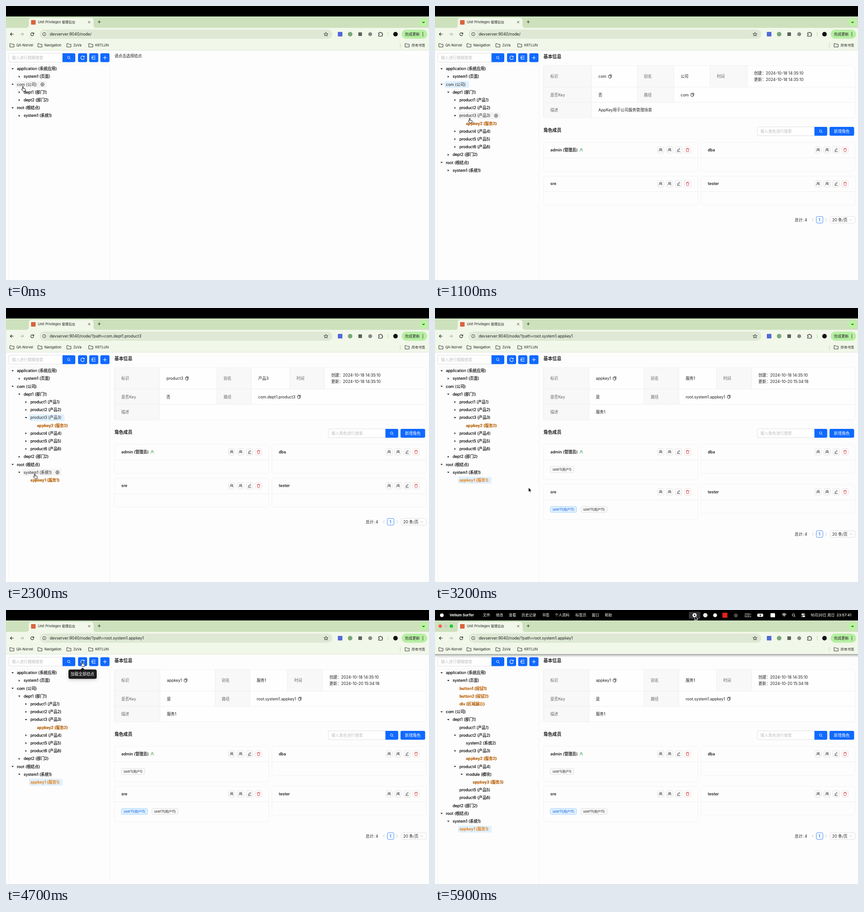
Animation, 928 px wide and 603 px high, one loop 6 s. Source, as an HTML page with a canvas:

```html
<!DOCTYPE html>
<html lang="zh">
<head>
<meta charset="utf-8">
<style>
html, body { margin: 0; width: 928px; height: 603px; overflow: hidden; background: #fdfdfd; }
canvas { display: block; }
</style>
</head>
<body>
<canvas id="stage" width="928" height="603"></canvas>
<script>
const c = document.getElementById('stage').getContext('2d');
const INK = '#1f1f1f', BLUE = '#0f69ff', LINE = '#efeff1', ORANGE = '#e5831f', RED = '#d3343c';
const LOOP = 6000, LOAD = 4900, MENU = 5500, LAZY = Infinity;

// Tree nodes: depth, label, time the node opens (none for a leaf)
const nodes = [
  [0, 'application (系统应用)', 0],
  [1, 'system1 (页面)', LOAD],
  [2, 'button1 (按钮1)'], [2, 'button2 (按钮2)'], [2, 'div (区域展示)'],
  [0, 'com (公司)', 0],
  [1, 'dept1 (部门1)', 600],
  [2, 'product1 (产品1)', LAZY],
  [2, 'product2 (产品2)', LOAD], [3, 'system2 (系统2)'],
  [2, 'product3 (产品3)', 1000], [3, 'appkey2 (服务2)'],
  [2, 'product4 (产品4)', LOAD], [3, 'module (模块)', LOAD], [4, 'appkey3 (服务3)'],
  [2, 'product5 (产品5)', LAZY], [2, 'product6 (产品6)', LAZY],
  [1, 'dept2 (部门2)', LAZY],
  [0, 'root (根结点)', 0],
  [1, 'system1 (系统1)', 2100], [2, 'appkey1 (服务1)'],
];

const pages = [
  { from: 300, key: 'com', alias: '公司', isKey: '否', path: 'com', desc: 'AppKey用于公司服务管理场景',
    updated: '2024-10-18 14:35:10', url: '', cols: [238, 343.5, 443.5, 524, 603.5, 685] },
  { from: 1300, key: 'product3', alias: '产品3', isKey: '否', path: 'com.dept1.product3', desc: '',
    updated: '2024-10-18 14:35:10', url: '?path=com.dept1.product3', cols: [238, 337, 462.5, 538.5, 622.5, 698.5] },
  { from: 2700, key: 'appkey1', alias: '服务1', isKey: '是', path: 'root.system1.appkey1', desc: '服务1', users: true,
    updated: '2024-10-20 15:34:18', url: '?path=root.system1.appkey1', cols: [238, 338, 458.5, 535, 617.5, 694.5] },
];

// Pointer stops: time, x, y
const stops = [
  [0, 37, 177], [300, 37, 177], [500, 29, 190], [600, 29, 190], [900, 44, 242], [1000, 44, 242],
  [1100, 76, 247], [1300, 76, 247], [1900, 29, 362], [2100, 29, 362], [2300, 63, 365], [2600, 80, 379],
  [2800, 80, 379], [3200, 205, 395], [3500, 225, 400], [3800, 341, 447], [4250, 341, 447],
  [4700, 167, 114], [4950, 167, 114], [5100, 144, 168], [5200, 165, 150], [5500, 550, 3], [5700, 570, 13], [6000, 570, 13],
];

function pointerAt(t) {
  const i = stops.findIndex(s => s[0] > t);
  const [t0, x0, y0] = stops[i - 1], [t1, x1, y1] = stops[i];
  const u = (t - t0) / (t1 - t0), k = u * u * (3 - 2 * u);
  return [x0 + (x1 - x0) * k, y0 + (y1 - y0) * k];
}

function text(s, x, y, size = 8.6, color = INK, weight = 400) {
  c.font = `${weight} ${size}px Inter, "Noto Sans CJK SC", "Noto Sans CJK JP", sans-serif`;
  c.fillStyle = color;
  c.fillText(s, x, y + size * .35);
  return x + c.measureText(s).width;
}
function box(x, y, w, h, r, fill, stroke) {
  c.beginPath();
  c.roundRect(x, y, w, h, r);
  if (fill) { c.fillStyle = fill; c.fill(); }
  if (stroke) { c.strokeStyle = stroke; c.lineWidth = .8; c.stroke(); }
}
function dot(x, y, r, fill) { box(x - r, y - r, 2 * r, 2 * r, r, fill); }
function icon(d, x, y, stroke = INK, width = .9, fill) {
  const p = new Path2D(d);
  c.save();
  c.translate(x, y);
  if (fill) { c.fillStyle = fill; c.fill(p); }
  c.strokeStyle = stroke;
  c.lineWidth = width;
  if (width) c.stroke(p);
  c.restore();
}
function rule(x0, y0, x1, y1, color = LINE) { icon(`M${x0} ${y0}L${x1} ${y1}`, 0, 0, color, 1); }

const FOLDER = 'M-4.5-3.5h3.2l1.3 1.4h4.5v6h-9z';
const LENS = 'M2-.6a2.6 2.6 0 1 1-5.2 0a2.6 2.6 0 1 1 5.2 0M1.3 1.4l2.3 2.3';
const COPY = 'M-1.8-3.6h5v6M-3.2-2.2h4.6v6h-3l-1.6-1.6z';
const PERSON = 'M1.7-1.5a1.7 1.7 0 1 1-3.4 0a1.7 1.7 0 1 1 3.4 0M-3 3.7c0-5 6-5 6 0';
const TEAM = 'M1-1.6a1.8 1.8 0 1 1-3.6 0a1.8 1.8 0 1 1 3.6 0M-3.8 3.4c0-4 5-4 5-1M1-3.3c2.5 0 2.5 3 .6 3.6l2.2 3';
const EDIT = 'M-2.5 1.6l.4-1.9l3.4-3.4l1.6 1.6l-3.4 3.4zM-3.7 3.6h7.4';
const TRASH = 'M-3.7-2.2h7.4M-1.4-2.3v-1.3h2.8v1.3M-2.7-2l.4 5.6h4.6l.4-5.6';
const GEAR = 'M-1.9-3.4h3.8l1.9 3.4l-1.9 3.4h-3.8l-1.9-3.4zM1.3 0a1.3 1.3 0 1 1-2.6 0a1.3 1.3 0 1 1 2.6 0';
const ARROW = 'M0 0v10l2.3-2.1l1.5 3.4l1.7-.8l-1.5-3.2h3.2z';
const HAND = 'M-.8.8c0-1.3 1.8-1.3 1.8 0v3.4l3.6.9c1 .3 1.2.8 1 1.8l-.7 3.8h-4.4l-3-3.9c-.7-1.1.5-1.9 1.7-.6z';
const IBEAM = 'M-2-5q2 0 2 1.5v7q0 1.5-2 1.5M2-5q-2 0-2 1.5v7q0 1.5 2 1.5M-1 1.5h2';

function browser(url) {
  box(0, 0, 928, 23, 0, '#000');
  box(0, 23, 928, 25, 0, '#cde1bd');
  box(0, 48, 928, 49.5, 0, '#f1f7e9');
  rule(0, 97.5, 928, 97.5, '#e4eadd');
  icon('M44 48q6 0 6-6v-10q0-6 6-6h130q6 0 6 6v10q0 6 6 6z', 0, 0, '', 0, '#f1f7e9');
  box(55, 31, 10, 10, 1, '#d9653d');
  text('Unit Privileges 管理后台', 70, 35.5, 7.4);
  icon('M-2.2-2.2l4.4 4.4M2.2-2.2l-4.4 4.4', 182.5, 35.5);
  icon('M-3.3 0h6.6M0-3.3v6.6', 204.5, 35);
  box(908, 28, 16, 15.5, 5, '#b5f79b');
  icon('M-2.3-1l2.3 2.2l2.3-2.2', 916, 35.8, INK, 1.2);

  icon('M3.7 0h-7.2M-.2-3.4l-3.4 3.4l3.4 3.4', 13, 62, INK, 1.1);
  icon('M-3.7 0h7.2M.2-3.4l3.4 3.4l-3.4 3.4', 35, 62, '#98a092', 1);
  icon('M3.2-1a3.3 3.3 0 1 0 .1 2M3.5-3.6v2.8h-2.8', 57.5, 62, INK, 1.1);
  box(74, 52, 642, 20, 10, '#dee8d5');
  dot(84, 62, 6.5, '#f1f7e9');
  icon('M3.8 0a3.8 3.8 0 1 1-7.6 0a3.8 3.8 0 1 1 7.6 0M0-.5v2.5M0-2.1v1', 84, 62);
  text('devserver:9040/node/' + url, 96, 62);
  icon('M0-4.4l1.3 3h3.2l-2.5 2l.9 3.2l-2.9-1.9l-2.9 1.9l.9-3.2l-2.5-2h3.2z', 702, 62.3);
  box(728, 57, 10, 10, 1, '#5268d8');
  dot(755, 62, 5, '#79a878');
  box(773, 58, 8, 8, 1, '#5d625c');
  dot(799, 62, 4.3, '#858a82');
  icon('M-4-3h2.6c0-2 2.6-2 2.6 0h2.6v2.6c1.7 0 1.7 2.2 0 2.2v2.7h-7.8v-2.5c2-.2 2-2.3 0-2.5z', 821.5, 62, INK, 1.1);
  rule(838.5, 57, 838.5, 67, '#b5e3a0');
  dot(854.5, 62, 5, '#111');
  box(868, 52, 56, 20, 10, '#b6efa3');
  text('完成更新', 875, 62, 8.2, INK, 500);
  [-3.4, 0, 3.4].forEach(d => dot(914.5, 62 + d, .95, INK));

  [['QA-Norvel', 13], ['Navigation', 74.5], ['ZuVa', 138], ['KRTLUN', 186], ['所有书签', 880]].forEach(([s, x], i) => {
    icon(FOLDER, x, 86.3);
    text(s, i < 4 ? x + 9.7 : 890, 86.5, 7.4);
  });
  rule(865, 82, 865, 92, '#b5e3a0');
}

function menuBar(t) {
  const alpha = Math.min(1, (t - MENU + 100) / 200);
  if (alpha <= 0) return;
  c.globalAlpha = alpha;
  dot(15, 11.5, 4, '#fff');
  text('Vellum Surfer', 32, 11.5, 8, '#fff', 700);
  [['文件', 105], ['修改', 133.5], ['查看', 162], ['历史记录', 190], ['书签', 235], ['个人资料', 263],
   ['标签页', 308], ['窗口', 344], ['帮助', 372.5]].forEach(([s, x]) => text(s, x, 11.5, 8, '#fff', 500));
  if (t >= 5700) box(557, 4, 25, 15, 2, '#343436');
  dot(569.5, 11.5, 4.5, '#fff');
  dot(569.5, 11.5, 1.7, '#222');
  dot(593, 11.5, 4.8, '#e8e8e8');
  dot(614.5, 11.5, 4.3, '#f2f2f2');
  box(630.5, 6, 11, 11, 0, '#e5201b');
  dot(660, 12, 4.4, '#4a4a4a');
  text('2KB/s', 679, 8.7, 5.2, '#fff');
  text('0KB/s', 679, 14.3, 5.2, '#fff');
  box(707, 8, 13, 7, 2, '#f2f2f2');
  icon('M1-3l-3 3.5h2.2l-.8 3l3.2-3.8h-2.2z', 713.5, 11.5, '', 0, '#000');
  box(736, 7, 10, 9, 1.5, '#fff');
  icon('M-4.5-1.5q4.5-4 9 0M-2.8.5q2.8-2.5 5.6 0M-1 2.3q1-1 2 0', 766, 11.5, '#fff', 1.3);
  icon(LENS, 787, 11.5, '#fff', 1);
  [8, 12.3].forEach((y, i) => {
    box(804, y - .3, 8, 3.4, 1.7, '#fff');
    dot(i ? 806 : 810, y + 1.4, 1, '#000');
  });
  text('10月20日 周日  23:57:41', 824, 11.5, 8, '#fff', 500);
  ['#ff5f57', '#c9cfc5', '#28c840'].forEach((color, i) => dot(11.5 + 12.2 * i, 35.5, 3.8, color));
  const shade = c.createLinearGradient(0, 97, 0, 104);
  shade.addColorStop(0, 'rgba(0,0,0,.32)');
  shade.addColorStop(1, 'rgba(0,0,0,0)');
  box(0, 97, 928, 7, 0, shade);
  c.globalAlpha = 1;
}

function search(x, y, w, hint) {
  box(x, y, w, 19.5, [3, 0, 0, 3], '#fff', '#d9d9d9');
  text(hint, x + 7, y + 9.8, 8.6, '#bfbfbf');
  box(x + w, y, 28, 19.5, [0, 3, 3, 0], BLUE);
  icon(LENS, x + w + 14, y + 9.8, '#fff');
}

// Draws the tree and tells whether the pointer is on a clickable row
function tree(t, selected, mx, my) {
  search(6, 104, 118, '输入进行模糊搜索');
  ['M3.3-2a3.9 3.9 0 1 0 .4 3.5M3.8-3.8v2.3h-2.3', 'M-4-3.5h8M-.8 0h4.8M-4 3.5h8M-4-1.6l2 1.6l-2 1.6z', 'M-4 0h8M0-4v8'].forEach((d, i) => {
    box(158 + 24.5 * i, 104, 20, 19.5, 3, BLUE);
    icon(d, 168 + 24.5 * i, 113.8, '#fff', 1.1);
  });
  box(6.5, 130, 221.5, 480, 3, null, LINE);
  let row = 0, closedDepth = 99, onRow = false;
  for (const [depth, label, open] of nodes) {
    if (depth > closedDepth) continue;
    closedDepth = t < open ? depth : 99;
    const x = 24 + 14.7 * depth, y = 138.2 + 17.2 * row++;
    const isKey = /^(appkey|button|div)/.test(label), weight = isKey ? 700 : 400;
    const end = text(label, x, y, 8.6, INK, weight);
    const inRow = Math.abs(my - y) < 8.6 && mx < end + 22;
    const hover = inRow && mx > x - 3;
    onRow ||= inRow && mx > x - 15;
    const isSelected = label.startsWith(selected + ' ');
    if (isSelected || hover)
      box(x - 3, y - 7.5, end - x + (hover ? 25 : 10), 15, 3, isSelected ? '#e0f0ff' : '#f3f3f3');
    text(label, x, y, 8.6, isKey ? ORANGE : INK, weight);
    if (hover) icon(GEAR, end + 12.5, y);
    if (open === undefined || (open === LAZY && t >= LOAD)) continue;
    icon(t < open ? 'M-1.3-2.4l2.8 2.4l-2.8 2.4z' : 'M-2.5-1.3h5l-2.5 2.8z', x - 9.5, y, '', 0, INK);
  }
  return onRow;
}

function info({ key, alias, isKey, path, desc, updated, cols }) {
  text('基本信息', 238, 112, 9.8, INK, 600);
  box(238, 131, 684, 115, 5, '#fefefe');
  const tops = [131, 178.5, 212, 246], mids = [155, 195.5, 229];
  const labels = [['标识', '别名', '时间'], ['是否Key', '路径'], ['描述']];
  labels.forEach((names, r) => names.forEach((name, i) => {
    const x = cols[2 * i], x1 = cols[2 * i + 1];
    box(x, tops[r], x1 - x, tops[r + 1] - tops[r], 0, '#f8f8f8');
    text(name, x + 15, mids[r], 8.6, '#646464');
    [x, x1].forEach(v => rule(v, tops[r], v, tops[r + 1]));
  }));
  [178.5, 212].forEach(y => rule(238, y, 922, y));
  box(238, 131, 684, 115, 5, null, LINE);
  const [, a, , b, , d] = cols.map(x => x + 15);
  icon(COPY, text(key, a, 155) + 8, 155);
  text(alias, b, 155);
  text('创建：2024-10-18 14:35:10', d, 148);
  text('更新：' + updated, d, 161.5);
  text(isKey, a, 195.5);
  icon(COPY, text(path, b, 195.5) + 8, 195.5);
  text(desc, a, 229);
}

function card(name, x, y, h) {
  box(x, y, 338.5, h, 5, '#fdfdfd', LINE);
  rule(x, y + 34, x + 338.5, y + 34);
  const end = text(name, x + 15, y + 16.5, 8.6, INK, 600);
  if (name[0] === 'a') icon(PERSON, end + 8, y + 16.5, '#389e4d');
  [TEAM, TEAM, EDIT, TRASH].forEach((d, i) => {
    const bx = x + 257 + 19.7 * i, color = i === 3 ? RED : INK;
    box(bx - 7, y + 9.8, 14, 14, 2.5, '#fff', i === 3 ? '#e6cfd0' : '#d6d6d6');
    icon(d, bx, y + 16.8, color, .85);
  });
}

function tag(label, x, y, blue) {
  const w = text(label, x + 5, y, 7.4) - x + 5;
  box(x, y - 6.5, w, 13, 2.5, blue ? '#e0f1ff' : '#fafafa', blue ? '#91caff' : '#d9d9d9');
  text(label, x + 5, y, 7.4, blue ? '#0958d9' : INK);
}

function roles(users) {
  text('角色成员', 238, 273.5, 9.8, INK, 600);
  search(707, 266, 125.5, '输入角色进行搜索');
  box(865.5, 266, 54, 19.5, 3, BLUE);
  text('新增角色', 875.3, 275.8, 8.6, '#fff');
  const y = users ? 388 : 374.5, h = users ? 77.5 : 64, foot = users ? 497.5 : 470.5;
  card('admin (管理员)', 238, 300, h);
  card('dba', 583.5, 300, 64);
  card('sre', 238, y, h);
  card('tester', 583.5, y, 64);
  if (users) {
    tag('user1(用户1)', 253, 355.5);
    tag('user11(用户11)', 253, 443.3, true);
    tag('user11(用户11)', 320, 443.3);
  }
  text('总计: 4', 789, foot);
  icon('M1.8-3.2l-3.5 3.2l3.5 3.2', 829, foot, '#bbb');
  box(836.5, foot - 7.3, 14.5, 14.6, 3, '#fff', BLUE);
  text('1', 841.6, foot, 8.6, BLUE, 600);
  icon('M-1.8-3.2l3.5 3.2l-3.5 3.2', 858, foot, '#bbb');
  box(867, foot - 7.3, 55, 14.6, 3, '#fff', '#d9d9d9');
  text('20 条/页', 871.5, foot);
  icon('M-2.5-1.2l2.5 2.5l2.5-2.5', 912, foot, '#aaa');
}

function tooltip(label, x, y, w, tipY, fill, color) {
  c.save();
  c.shadowColor = 'rgba(0,0,0,.2)';
  c.shadowBlur = 8;
  c.shadowOffsetY = 2;
  box(x, y, w, 20.5, 4, fill);
  c.restore();
  const mid = x + w / 2, base = tipY < y ? y : y + 20.5;
  icon(`M${mid - 4.5} ${base}L${mid} ${tipY}L${mid + 4.5} ${base}z`, 0, 0, '', 0, fill);
  text(label, x + 5, y + 10.3, 8.6, color);
}

function draw(t) {
  const [mx, my] = pointerAt(t);
  const page = pages.findLast(p => t >= p.from);
  box(0, 0, 928, 603, 0, '#fdfdfd');
  browser(page ? page.url : '');
  const onRow = tree(t, page && page.key, mx, my);
  if (page) {
    info(page);
    roles(page.users);
  } else text('请点击选择结点', 238, 110);
  if (t >= 3900 && t < 4400) tooltip('继承自: root.system1', 304, 411, 91.5, 435, '#fff', INK);
  if (t >= 4700 && t < 5200) tooltip('加载全部结点', 137, 131, 62, 127, '#1c1c1e', '#fff');
  menuBar(t);

  const onButton = my > 104 && my < 123.5 && mx > 124 && mx < 227;
  const onTag = my > 436 && my < 451 && mx > 253 && mx < 380;
  if (onTag) {
    icon(IBEAM, mx, my, '#fff', 2);
    icon(IBEAM, mx, my, '#111', 1);
  } else if (onRow || onButton) icon(HAND, mx, my, '#111', 1, '#fff');
  else icon(ARROW, mx, my, '#fff', 1, '#000');
}

function tick() {
  draw(Math.floor(performance.now() % LOOP / 100) * 100);
  requestAnimationFrame(tick);
}
tick();
</script>
</body>
</html>
```
